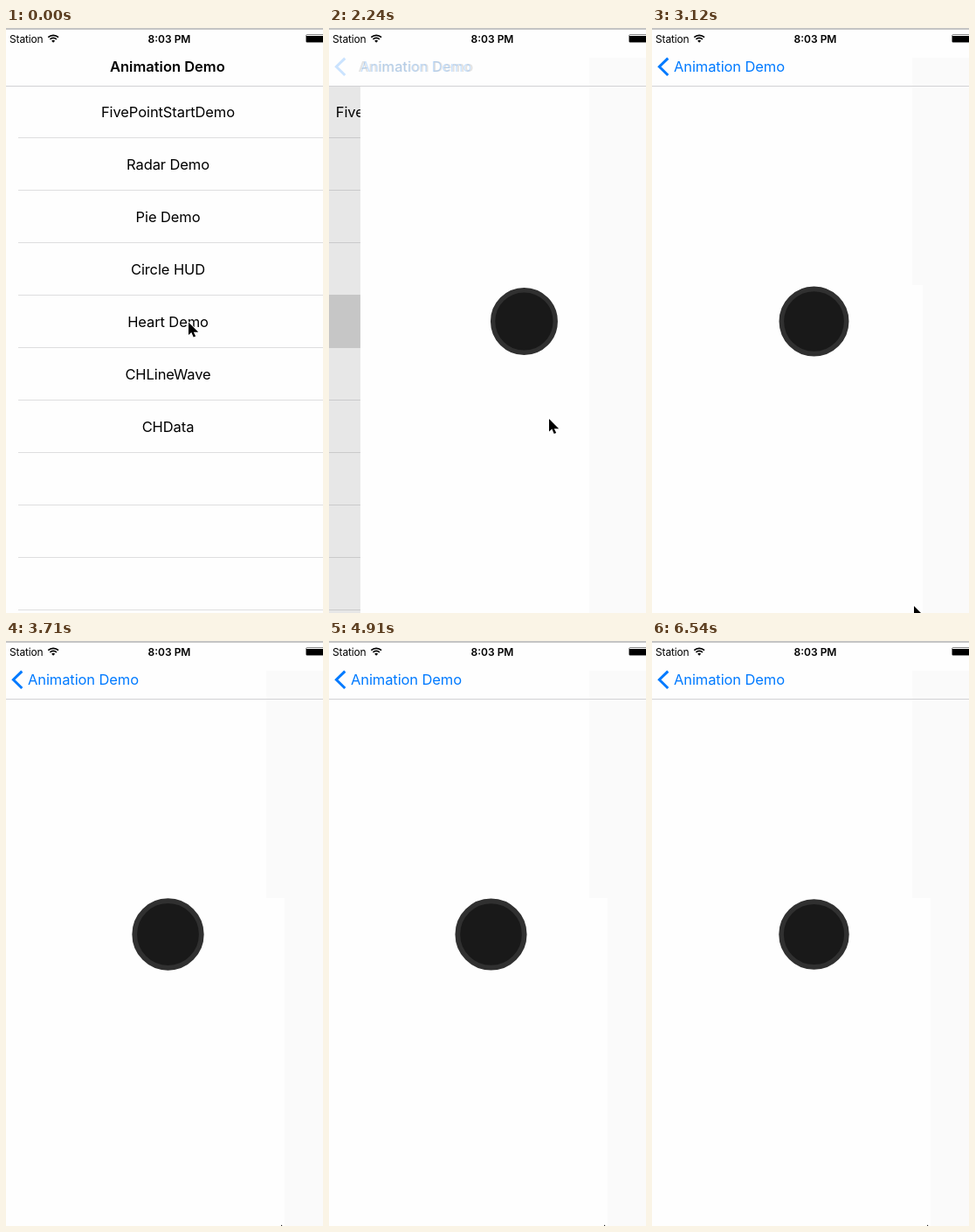
These frames come from a looping animation (363 px wide and 669 px high, 6640 ms). An HTML page:

```html
<!DOCTYPE html>
<html lang="en">
<head>
<meta charset="utf-8">
<title>Animation Demo</title>
<style>
  html, body { margin: 0; width: 100%; height: 100%; overflow: hidden; background: #fefefe; }
  svg { display: block; }
  text { font: 16.5px Inter, Roboto, sans-serif; letter-spacing: -.1px; }
  .mid { text-anchor: middle; }
  .status { font-size: 12px; letter-spacing: -.15px; }
  .bold { font-weight: 600; letter-spacing: 0; }
  .back { fill: #007aff; }
</style>
</head>
<body>
<svg width="363" height="669" viewBox="0 0 363 669">
  <g id="list">
    <rect x="-2" width="375" height="669" fill="#fefefe"/>
    <g id="lines" fill="#dededf"></g>
    <rect id="highlight" x="-2" y="305" width="375" height="61" fill="#d9d9d9"/>
    <g id="labels"></g>
  </g>
  <rect id="dim" width="363" height="669"/>

  <rect id="page" x="-2" width="375" height="669" fill="#fefefe"/>
  <rect width="363" height="66" fill="#fefefe"/>
  <path id="shade" fill="#fafafa"/>
  <circle id="badge" cy="335.5" fill="#191919" stroke="#303030"/>

  <rect y="66" width="363" height="1" fill="#d2d2d4"/>
  <rect width="363" height="2" fill="#c4c4c4"/>
  <text class="status" x="4" y="17">Station</text>
  <g fill="none" stroke="#000" stroke-width="1.7">
    <path d="M48.3 10.7a8.3 8.3 0 0 1 11.7 0M50.4 13a5.3 5.3 0 0 1 7.5 0"/>
    <path d="M54.1 16.8l-2-2.1a2.8 2.8 0 0 1 4 0z" fill="#000" stroke="none"/>
  </g>
  <text class="status bold mid" x="187" y="17">8:03 PM</text>
  <rect x="343.5" y="7.5" width="26" height="9" rx="1.5" fill="#fefefe" stroke="#8a8a8a"/>
  <rect x="344" y="9" width="26" height="7"/>

  <text id="title" class="bold" y="50">Animation Demo</text>
  <g id="back">
    <path d="M18.3 34.6L8.4 44.3L18.3 54" fill="none" stroke="#007aff" stroke-width="3"/>
    <text id="backLabel" class="back" y="50">Animation Demo</text>
  </g>

  <path id="cursor" d="M0 0V14.6L3.3 11.6L5.7 17L8.2 15.9L5.8 11.2H11.2Z"
        stroke="#fff" stroke-width="1.6" paint-order="stroke"/>
</svg>
<script>
const LOOP = 6640, TAP = 1800, PUSH = 2090, REFRESH = 148.3;
const WIDTH = 375, CENTER = 185.5, ROW = 60, NAV = 66;
const BEAT = 400;
const LABELS = ["FivePointStartDemo", "Radar Demo", "Pie Demo", "Circle HUD",
                "Heart Demo", "CHLineWave", "CHData"];

// Pointer stops on its way off the screen
const POINTER = [
  { step: 0, x: 209, y: 336.5 },
  { step: 1, x: 252, y: 447 },
  { step: 7, x: 300, y: 661 },
  { step: 9, x: 315, y: 667.5 },
];

const $ = id => document.getElementById(id);
const set = (id, attrs) => {
  for (const name in attrs) $(id).setAttribute(name, attrs[name]);
};

function buildRows() {
  for (let y = NAV + ROW - 1; y < 669; y += ROW)
    $("lines").innerHTML += `<rect x="14" y="${y}" width="359" height="1"/>`;
  $("labels").innerHTML = LABELS.map((label, i) =>
    `<text class="mid" x="${CENTER}" y="${NAV + 36 + i * ROW}">${label}</text>`).join("");
}

// Critically damped spring, 0 to 1, already under way at the first step
function pushProgress(step) {
  const u = .815 + 3.06 * step;
  return 1 - (1 + u) * Math.exp(-u);
}

function badgeSize(step) {
  return 80.5 - 3.5 * Math.cos(2 * Math.PI * (step - 1) * REFRESH / BEAT);
}

function pointerAt(step) {
  const next = POINTER.findIndex(stop => stop.step > step);
  if (next < 0) return POINTER.at(-1);
  const a = POINTER[next - 1], b = POINTER[next];
  const k = (step - a.step) / (b.step - a.step);
  return { x: a.x + (b.x - a.x) * k, y: a.y + (b.y - a.y) * k };
}

function draw(time) {
  const pushing = time >= PUSH;
  // The small bias absorbs uneven screen refreshes
  const step = pushing ? Math.floor((time - PUSH) / REFRESH + .06) : 0;
  const p = pushing ? pushProgress(step) : 0;
  const offset = (1 - p) * WIDTH;
  const size = badgeSize(step);
  const { x, y } = pointerAt(step);
  const shadeEdge = Math.min(319, Math.max(298, x + 10));

  set("highlight", { opacity: time >= TAP ? 1 : 0 });
  set("list", { transform: `translate(${-.3 * WIDTH * p})` });
  set("dim", { opacity: .1 * p });
  set("page", { transform: `translate(${offset})` });
  set("badge", { cx: CENTER + offset, r: size * .465, "stroke-width": size * .07 });
  set("shade", { d: `M298 34H363V669H${shadeEdge}V294H298Z`, opacity: pushing ? 1 : 0 });
  set("title", { x: 119 - 95 * p, opacity: 1 - p });
  set("back", { opacity: p ** 15 });
  set("backLabel", { x: 25 + 109 * (1 - p) });
  set("cursor", { transform: `translate(${x} ${y})` });
}

buildRows();
const start = performance.now();
function tick() {
  draw((performance.now() - start) % LOOP);
  requestAnimationFrame(tick);
}
tick();
</script>
</body>
</html>
```
